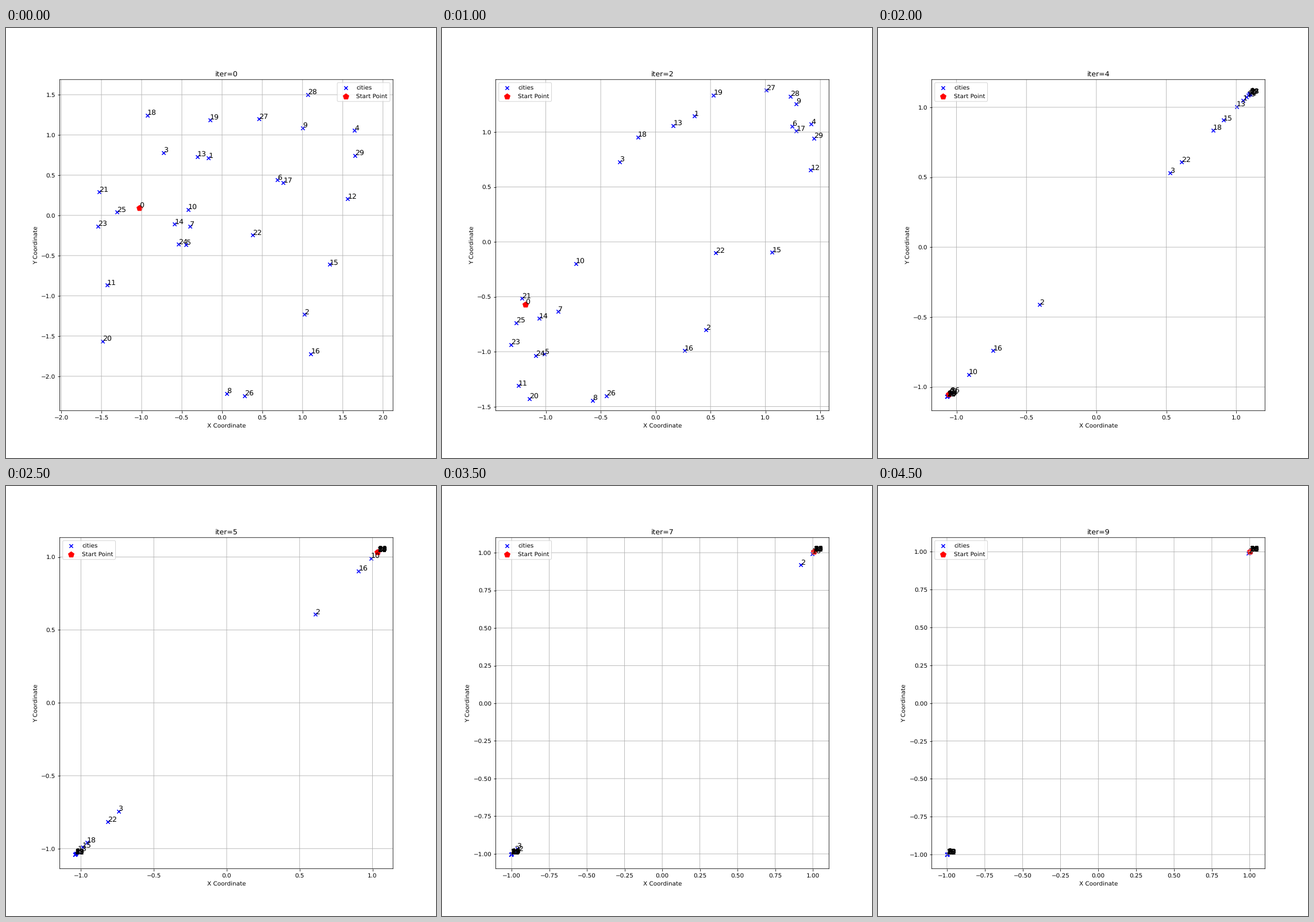
Write a matplotlib script that moves like this. It is 748 px wide and 748 px high and loops after 5000 ms.

```python
import numpy as np
import matplotlib.pyplot as plt
from matplotlib.animation import FuncAnimation

STEPS = 10
CITIES = 30

# Keep lines and glyphs at their true sub-pixel places.
plt.rcParams.update({"path.snap": False, "text.hinting": "none"})


def standardise(pts):
    return (pts - pts.mean(axis=0)) / pts.std(axis=0)


def mix(pts):
    """Average all points with softmax weights that favour distant ones."""
    dist = np.linalg.norm(pts[:, None] - pts[None], axis=2)
    weight = np.exp(dist)
    weight /= weight.sum(axis=1, keepdims=True)
    return standardise(weight @ pts)


np.random.seed(1234)
states = [standardise(np.random.rand(CITIES, 2))]
while len(states) < STEPS:
    states.append(mix(states[-1]))

fig, ax = plt.subplots(figsize=(10, 10), dpi=74.8)


def draw(step):
    pts = states[step]
    ax.clear()
    ax.scatter(pts[:, 0], pts[:, 1], marker="x", color="blue", label="cities")
    ax.scatter(*pts[0], marker="p", color="red", s=100, label="Start Point")
    for i, (x, y) in enumerate(pts):
        ax.text(x, y, str(i), fontsize=12)
    ax.axis("equal")
    ax.grid(True)
    ax.set_title(f"iter={step}")
    ax.set_xlabel("X Coordinate")
    ax.set_ylabel("Y Coordinate")
    ax.legend()
    return []


anim = FuncAnimation(fig, draw, frames=STEPS, interval=500,
                     repeat=True, repeat_delay=0)
plt.show()
```
